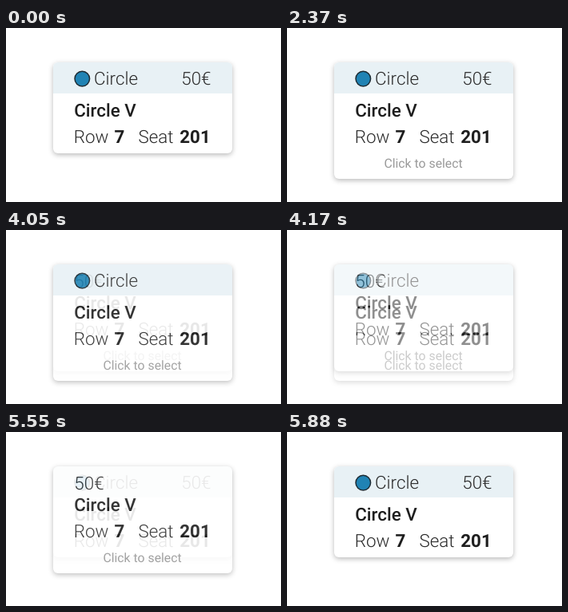
An HTML page that plays this animation: 344x218 px, repeating every 5.91 s.

```html
<!DOCTYPE html>
<html lang="en">
<head>
<meta charset="utf-8">
<title>Seat tooltip</title>
<style>
html, body { margin: 0; width: 100%; height: 100%; overflow: hidden; background: #fff; }
.state { position: absolute; left: 0; top: 0; width: 344px; height: 218px; background: #fff; }
.card {
  position: absolute; left: 58.5px; top: 43px; width: 224.5px; overflow: hidden;
  border-radius: 6px; background: #fff; box-shadow: 0 2px 6px rgba(0, 0, 0, .28);
}
.head { height: 39px; background: #e8f1f5; }
svg { position: absolute; left: 0; top: 0; }
text { font: 300 22.4px Roboto, sans-serif; fill: #2a2a2a; text-rendering: geometricPrecision; }
.title { font-weight: 500; fill: #1e1e1e; }
.bold { font-weight: 700; fill: #1e1e1e; }
.hint { font-size: 15.8px; font-weight: 400; fill: #999; }
</style>
</head>
<body>
<script>
const LOOP = 5910, FADE = 300;

const text = (x, y, str, cls = '', anchor = 'start') =>
  `<text x="${x}" y="${y}" class="${cls}" text-anchor="${anchor}">${str}</text>`;

const header = `<circle cx="95.3" cy="63.6" r="9.3" fill="#2083b4" stroke="#1d2b33" stroke-width="1.5"/>`
  + text(110, 71, 'Circle');
const price = text(256.5, 71, '50€', '', 'end');
const lowPrice = text(85.3, 72, '50€');
const hint = y => text(121.4, y, 'Click to select', 'hint');
const seat = y => text(85.2, y, 'Circle V', 'title')
  + text(84.7, y + 33, 'Row') + text(135.6, y + 33, '7', 'bold')
  + text(165.4, y + 33, 'Seat') + text(255.8, y + 33, '201', 'bold', 'end');

const plain = { height: 113.5, head: true, body: header + price + seat(111) };
const states = [
  { start: -FADE, ...plain },
  { start: 1140, height: 145.5, head: true, body: header + price + seat(111) + hint(174.7) },
  { start: 2580, height: 145.5, head: true, body: header + seat(111) + hint(174.7) },
  { start: 4020, height: 134, head: false, body: lowPrice + seat(99.4) + hint(163.2) },
  { start: 5520, ...plain }
];

// Every state is opaque, so fading one in over the last is a true cross-fade.
for (const s of states) {
  s.el = document.createElement('div');
  s.el.className = 'state';
  s.el.innerHTML = `<div class="card" style="height:${s.height}px">${s.head ? '<div class="head"></div>' : ''}</div>
    <svg width="344" height="218">${s.body}</svg>`;
  document.body.append(s.el);
}

const origin = performance.now();
function draw() {
  const t = (performance.now() - origin) % LOOP;
  for (const s of states)
    s.el.style.opacity = Math.min(1, Math.max(0, (t - s.start) / FADE));
  requestAnimationFrame(draw);
}
draw();
</script>
</body>
</html>
```
